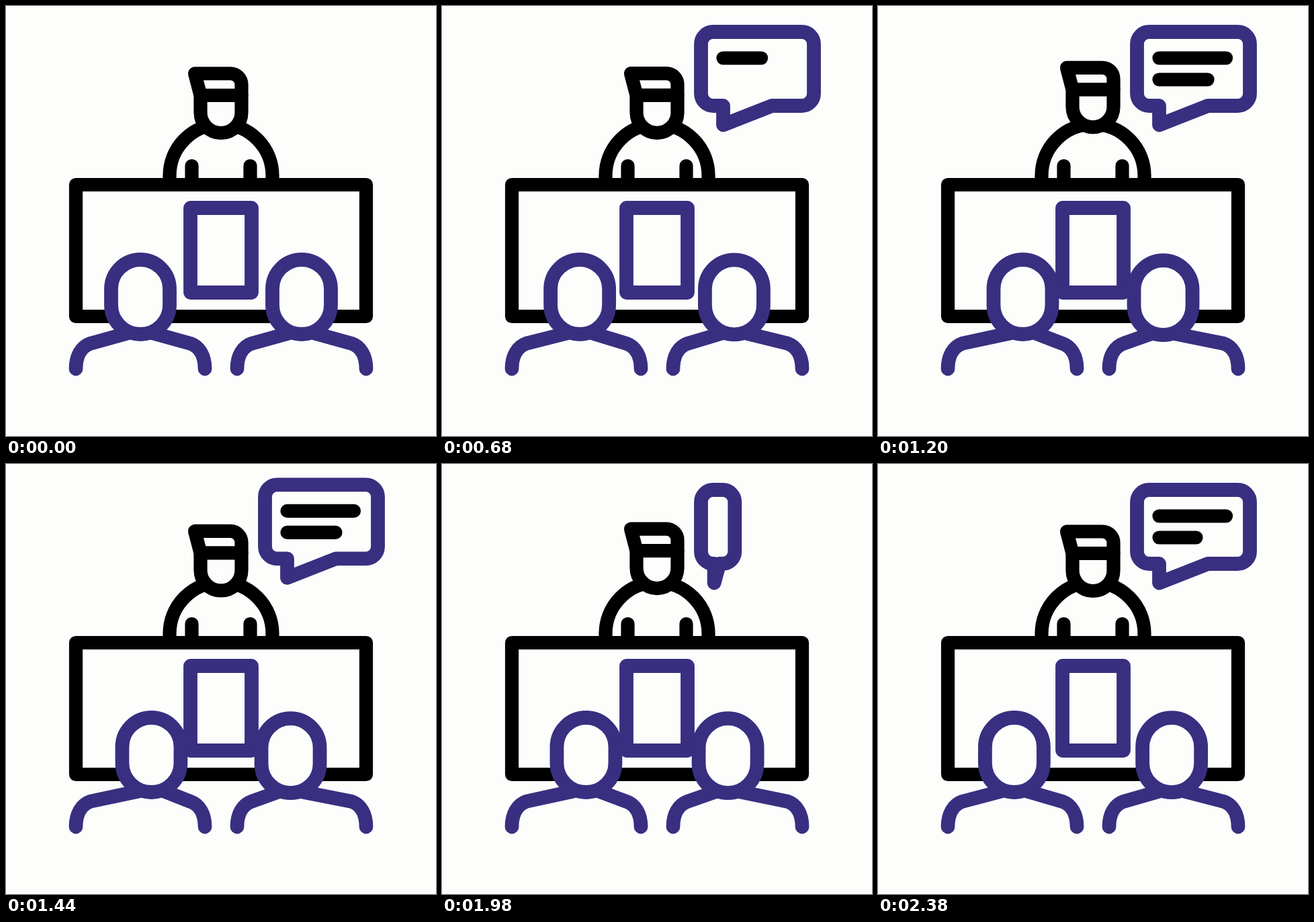
An HTML page with a canvas for the animation above (2400 ms loop, 640 px wide and 640 px high).

```html
<!DOCTYPE html>
<html lang="en">
<head>
<meta charset="utf-8">
<title>Presentation</title>
<style>
  html, body { margin: 0; width: 100%; height: 100%; overflow: hidden; background: #fdfdfc; }
  canvas { display: block; width: 100vmin; height: 100vmin; }
</style>
</head>
<body>
<canvas id="stage" width="640" height="640"></canvas>
<script>
const ctx = document.getElementById('stage').getContext('2d');
const LOOP = 2400;
const PAPER = '#fdfdfc', INK = '#000', PLUM = '#392f80';

const lerp = (a, b, p) => a + (b - a) * p;
const span = (t, start, length) => Math.min(1, Math.max(0, (t - start) / length));
const smooth = p => p * p * (3 - 2 * p);
const cubic = p => p < 0.5 ? 4 * p ** 3 : 1 - 4 * (1 - p) ** 3;

function draw(color, build, filled) {
  ctx.beginPath();
  build(ctx);
  if (filled) {
    ctx.fillStyle = PAPER;
    ctx.fill();
  }
  ctx.strokeStyle = color;
  ctx.lineWidth = color === INK ? 20.2 : 20.8;
  ctx.stroke();
}

function line(color, x1, y1, x2, y2) {
  draw(color, c => { c.moveTo(x1, y1); c.lineTo(x2, y2); });
}

function presenter(lift) {
  draw(INK, c => {
    c.moveTo(243.5, 266);
    c.arc(320, 252.5, 76.5, Math.PI, 0);
    c.lineTo(396.5, 266);
  });
  line(INK, 276.5, 238, 276.5, 266);
  line(INK, 363.5, 238, 363.5, 266);

  ctx.save();
  ctx.translate(0, -lift);
  draw(INK, c => {
    c.moveTo(281, 100.5);
    c.lineTo(334, 100.5);
    c.arcTo(350.5, 100.5, 350.5, 117, 16.5);
    c.lineTo(350.5, 158.5);
    c.arc(320, 158.5, 30.5, 0, Math.PI);
    c.lineTo(289.5, 133);
    c.closePath();
  }, true);
  line(INK, 289.5, 133, 350.5, 133);
  ctx.restore();
}

function listener(x, shift, drop) {
  const y = 487 + drop;
  for (const side of [-1, 1]) {
    draw(PLUM, c => {
      c.moveTo(x + side * 96, 540);
      c.bezierCurveTo(x + side * 96, 521, x + side * 88, 507, x + side * 74, 502.2);
      c.lineTo(x + side * 19 + shift, y);
    });
  }
  draw(PLUM, c => {
    c.arc(x + shift, 421 + drop, 43.5, Math.PI, 0);
    c.arc(x + shift, 445 + drop, 43.5, 0, Math.PI);
    c.closePath();
  }, true);
}

// A dot rises into a narrow capsule, which widens into the full bubble.
function bubble(t) {
  if (t <= 0) return;
  const rise = smooth(span(t, 0, 345));
  const widen = smooth(span(t, 345, 235));
  const tailX = lerp(403.5, 418.5, widen), tailY = 177;
  const x = v => lerp(403.5, v, rise);
  const y = v => lerp(tailY, v, rise);
  const left = x(385.5), right = x(lerp(421.5, 553.5, widen));
  const top = y(38.5), bottom = y(148.5), r = 18 * rise;

  draw(PLUM, c => {
    c.moveTo(tailX, tailY);
    c.lineTo(lerp(403.5, 491, widen), bottom);
    c.lineTo(right - r, bottom);
    c.arcTo(right, bottom, right, bottom - r, r);
    c.lineTo(right, top + r);
    c.arcTo(right, top, right - r, top, r);
    c.lineTo(left + r, top);
    c.arcTo(left, top, left, top + r, r);
    c.lineTo(left, bottom - r);
    c.arcTo(left, bottom, left + r, bottom, r);
    c.lineTo(tailX, bottom);
    c.closePath();
  });

  const first = smooth(span(t, 560, 185));
  const second = smooth(span(t, 670, 180));
  if (first > 0) line(INK, 418.5, 77.5, lerp(418.5, 518, first), 77.5);
  if (second > 0) line(INK, 418.5, 109.5, lerp(418.5, 490.5, second), 109.5);
}

function render(t) {
  ctx.fillStyle = PAPER;
  ctx.fillRect(0, 0, 640, 640);
  ctx.lineCap = ctx.lineJoin = 'round';

  const phase = (t % 700) / 350;
  const lift = t < 2100 ? 14.3 * smooth(phase < 1 ? phase : 2 - phase) : 0;
  const lean = cubic(span(t, 0, 1600)) - cubic(span(t, 1600, 1205));

  presenter(lift);
  draw(INK, c => c.rect(104, 266, 432, 196));
  draw(PLUM, c => c.rect(274.5, 300.5, 91, 126));
  listener(200, 16.5 * lean, 0);
  listener(440, -16.5 * lean, 1.2 * lean);

  ctx.save();
  ctx.translate(0, -200 * smooth(span(t, 1400, 350)));
  if (t < 1750) bubble(t - 20);
  ctx.restore();
  bubble(t - 1588);
}

function tick() {
  render(performance.now() % LOOP);
  requestAnimationFrame(tick);
}
tick();
</script>
</body>
</html>
```
